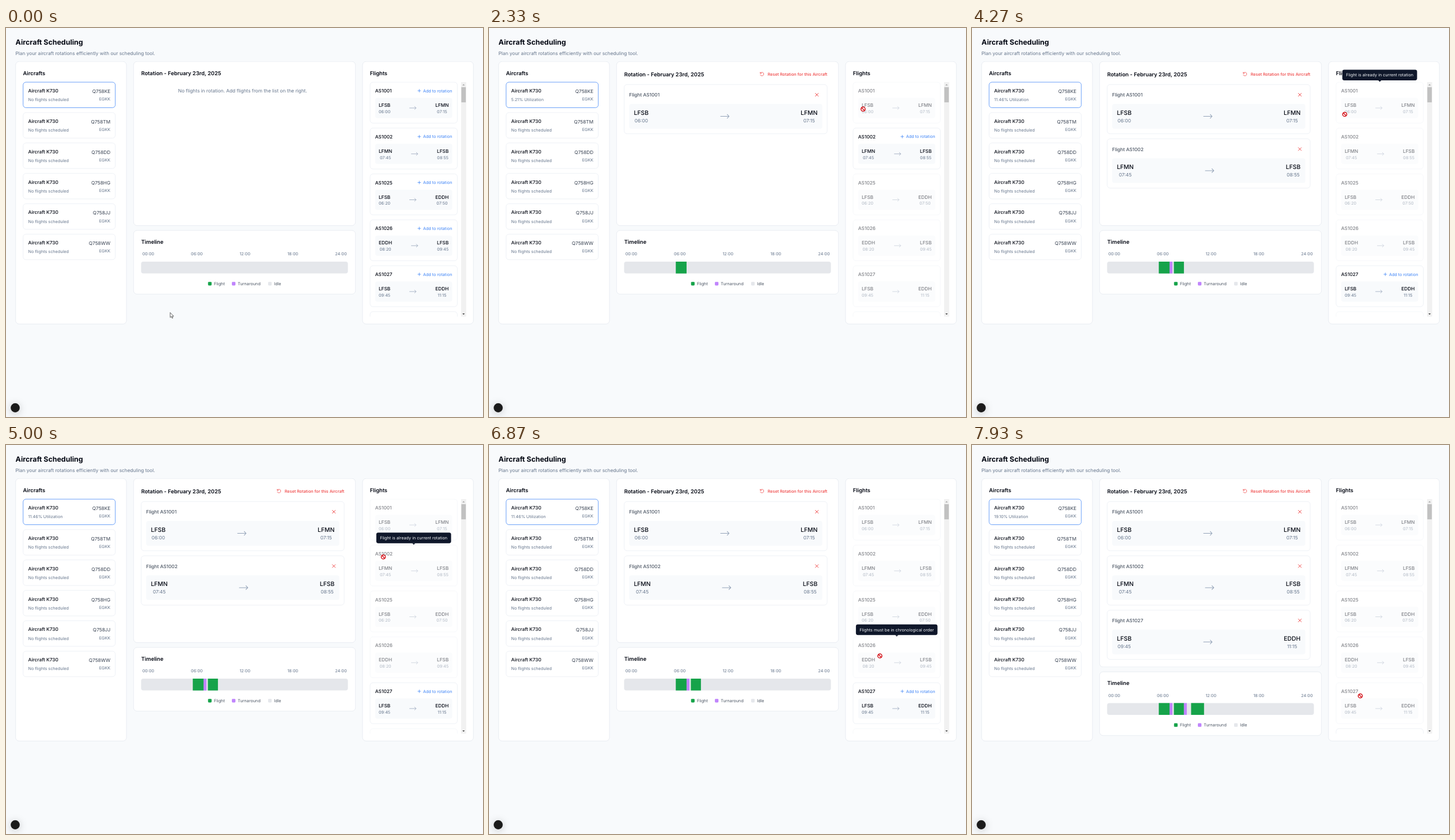
These frames come from a looping animation (828x676 px, 8 s). An HTML page:

```html
<!DOCTYPE html>
<html lang="en">
<head>
<meta charset="utf-8">
<title>Aircraft Scheduling</title>
<style>
  html, body { margin: 0; width: 100%; height: 100%; overflow: hidden; background: #f8fafc; }
  svg { display: block; width: 828px; height: 676px; }
  text { font-family: Inter, sans-serif; text-rendering: geometricPrecision; white-space: pre; }
  .panel { fill: #fff; stroke: #e2e8f0; stroke-width: .6; filter: drop-shadow(0 .6px .6px rgba(0,0,0,.07)); }
  .card { fill: #fff; stroke: #e2e8f0; stroke-width: .6; }
  .card.active { stroke: #3b82f6; stroke-width: .75; }
  .inner { fill: #f8fafc; }
  .line { fill: none; stroke-linecap: round; stroke-linejoin: round; }
  .badge { fill: #1b1b1b; filter: drop-shadow(0 2px 7px rgba(0,0,0,.22)); }
</style>
</head>
<body>
<svg id="stage" viewBox="0 0 828 676"></svg>
<script>
const INK = '#030712', SOFT = '#374151', GRAY = '#4b5563', MUTED = '#64748b';
const BLUE = '#3b82f6', RED = '#ef4444', GREEN = '#16a34a', PURPLE = '#c084fc', IDLE = '#e5e7eb';
const XS = 7.245, SM = 8.28, MD = 9.315, LG = 10.35, XL = 12.42;
const PITCH = 79.75, LOOP = 8000, STEP = 1000 / 15;

const FLIGHTS = [
  ['AS1001', 'LFSB', '06:00', 'LFMN', '07:15'],
  ['AS1002', 'LFMN', '07:45', 'LFSB', '08:55'],
  ['AS1025', 'LFSB', '06:20', 'EDDH', '07:50'],
  ['AS1026', 'EDDH', '08:20', 'LFSB', '09:45'],
  ['AS1027', 'LFSB', '09:45', 'EDDH', '11:15'],
  ['AS1028', 'EDDH', '12:00', 'LFSB', '13:25']
];
const ROTATION = [0, 1, 4];
const CLICKS = [1733, 3133, 7533];
const USAGE = ['No flights scheduled', '5.21% Utilization', '11.46% Utilization', '19.10% Utilization'];
// flights that can be added after each click
const OPEN = [[0, 1, 2, 3, 4, 5], [1], [4], [5]];
const PLANES = ['Q758KE', 'Q758TM', 'Q758DD', 'Q758HG', 'Q758JJ', 'Q758WW'];

// pointer stops: time, x, y
const PATH = [
  [0, 285, 494.5], [67, 285, 494.5], [933, 608, 151.5], [1067, 608, 151.5], [1533, 649, 139.5],
  [2267, 649, 139.5], [3000, 663.5, 199.5], [3667, 663.5, 200], [3933, 634, 172], [4133, 647, 150],
  [4667, 647, 150], [5000, 655, 194.5], [5200, 655, 194.5], [5733, 674.5, 272], [6067, 674.5, 272],
  [6733, 678, 364.5], [6867, 678.5, 366.5], [7333, 674, 436], [LOOP, 674, 436]
];

const text = (x, y, size, fill, str, weight = 400, anchor = 'start', id = '') =>
  `<text x="${x}" y="${y + size * .364}" font-size="${size}" fill="${fill}" font-weight="${weight}" text-anchor="${anchor}"${id && ` id="${id}"`}>${str}</text>`;
const box = (x, y, w, h, r, attrs) =>
  `<rect x="${x}" y="${y}" width="${w}" height="${h}" rx="${r}" ${attrs}/>`;
const line = (d, color, width) =>
  `<path class="line" d="${d}" stroke="${color}" stroke-width="${width}"/>`;
const arrow = (x, y, half, head) =>
  line(`M${x - half} ${y}h${2 * half}m${-head} ${-head}l${head} ${head}l${-head} ${head}`, '#94a3b8', half / 7.2);
const group = (id, body, attrs = '') => `<g id="${id}" ${attrs}>${body}</g>`;
const minutes = s => { const [h, m] = s.split(':'); return h * 60 + +m; };
const timeX = m => 234.5 + 359 * m / 1440;

function planeCard(reg, i) {
  const y = 94.1 + i * 52.83;
  return box(29.7, y, 160, 44.4, 5, `class="card${i ? '' : ' active'}"`) +
    text(38.5, y + 14.9, SM, INK, 'Aircraft K730', 500) +
    text(38.5, y + 30.5, XS, MUTED, USAGE[0], 400, 'start', i ? '' : 'usage') +
    text(181.2, y + 16, SM, SOFT, reg, 400, 'end') +
    text(181.2, y + 29.6, XS, MUTED, 'EGKK', 400, 'end');
}

function flightCard([no, from, dep, to, arr], i) {
  const wide = from !== 'LFSB', a = wide ? 658.6 : 657.1, b = wide ? 758.2 : 756.9;
  return group('flight' + i,
    box(632, 94.1, 151.4, 71.2, 5, `class="card" id="edge${i}"`) +
    box(640.8, 121.4, 133.8, 35.2, 4, 'class="inner"') +
    text(640.8, 109, SM, INK, no, 500) +
    text(a, 134, SM, INK, from, 500, 'middle') + text(a, 145.3, XS, MUTED, dep, 400, 'middle') +
    text(b, 134, SM, INK, to, 500, 'middle') + text(b, 145.3, XS, MUTED, arr, 400, 'middle') +
    arrow(wide ? 709.2 : 706.2, 139, 5.6, 2.5) +
    group('add' + i,
      line('M714.9 109h4.9M717.35 106.55v4.9', BLUE, .75) +
      text(774.6, 108.9, XS, BLUE, 'Add to rotation', 400, 'end')),
    `transform="translate(0 ${i * PITCH})"`);
}

function rotationCard([no, from, dep, to, arr], i) {
  const wide = from !== 'LFSB', a = wide ? 266 : 264.3, b = wide ? 557.5 : 555.7;
  return `<g transform="translate(0 ${i * 94.4})">` +
    box(234.7, 98.2, 352.3, 85.6, 5, 'class="card"') +
    box(243.3, 132, 335.3, 42.9, 4, 'class="inner"') +
    text(243.3, 116.2, SM, GRAY, 'Flight ' + no, 500) +
    line('M566.5 113.4l5.2 5.2M571.7 113.4l-5.2 5.2', RED, .95) +
    text(a, 147.2, LG, INK, from, 500, 'middle') + text(a, 160.7, SM, MUTED, dep, 400, 'middle') +
    text(b, 147.2, LG, INK, to, 500, 'middle') + text(b, 160.7, SM, MUTED, arr, 400, 'middle') +
    arrow(wide ? 412.4 : 409.4, 153.5, 7.4, 3.3) + '</g>';
}

function timeline(list) {
  let s = box(221.5, 351.8, 385, 110.6, 6, 'class="panel"') +
    text(234.7, 371.5, MD, INK, 'Timeline', 600);
  [['00:00', 236.7, 'start'], ['06:00', 331.2, 'middle'], ['12:00', 414.7, 'middle'],
   ['18:00', 497.7, 'middle'], ['24:00', 591.5, 'end']]
    .forEach(([str, x, anchor]) => s += text(x, 392.6, XS, MUTED, str, 400, anchor));
  s += box(234.5, 406, 359, 20.6, 4, `fill="${IDLE}"`);
  const bar = (m, len, color) => box(timeX(m), 406, 359 * len / 1440, 20.6, 0, `fill="${color}"`);
  list.forEach(([, , dep, , arr], i) => {
    const start = minutes(dep), end = minutes(arr);
    s += bar(start, end - start, GREEN);
    if (i < list.length - 1) s += bar(end, 20, PURPLE);
  });
  [['Flight', 350.7, GREEN], ['Turnaround', 392.1, PURPLE], ['Idle', 455, IDLE]]
    .forEach(([str, x, color]) => s += box(x, 441.2, 6.2, 6.2, 1.4, `fill="${color}"`) +
      text(x + 10.2, 444.4, XS, GRAY, str));
  return s;
}

function middle(n) {
  const list = ROTATION.slice(0, n).map(i => FLIGHTS[i]), grow = n === 3 ? 42.4 : 0;
  let s = box(221.5, 58.3, 385, 285 + grow, 6, 'class="panel"') +
    text(234.7, n ? 80.4 : 78.2, MD, INK, 'Rotation - February 23rd, 2025', 600);
  s += n
    ? line('M471 78.6a3.1 3.1 0 1 1-.1 2.7M470.9 76.9v2h2', RED, .8) +
      text(587.3, 80.3, XS, RED, 'Reset Rotation for this Aircraft', 500, 'end')
    : text(410.7, 108.5, SM, MUTED, 'No flights in rotation. Add flights from the list on the right.', 400, 'middle');
  s += list.map(rotationCard).join('');
  return group('mid' + n, s + `<g transform="translate(0 ${grow})">${timeline(list)}</g>`);
}

const scrollbar = box(789.9, 94, 8.8, 407.5, 0, 'fill="#f1f1f1"') +
  box(790.4, 102.8, 7.8, 26.4, 0, 'fill="#c1c1c1"') +
  '<path d="M792.2 99.7h4.2l-2.1-2.3z" fill="#a3a3a3"/><path d="M792.2 496h4.2l-2.1 2.3z" fill="#404040"/>';

const pointers = {
  arrow: '<path d="M0 0V8.6L2 6.8L3.4 9.9L4.7 9.3L3.4 6.4H6.1Z" fill="#fff" stroke="#111" stroke-width=".65"/>',
  hand: '<path d="M-1 7.2V1Q-1 0 0 0Q1 0 1 1V4.1Q2.2 3.5 2.7 4.5Q3.9 4.1 4.3 5.1Q5.7 4.9 5.7 6.2V8.6Q5.7 10 4.8 11V12.3H-.8V11.2L-3.4 7.7Q-4 6.6 -3.1 6.2Q-2.2 5.9 -1 7.2Z" fill="#fff" stroke="#111" stroke-width=".7"/><path d="M1 4.1V6.4M2.7 4.6V6.6M4.3 5.2V6.8" stroke="#111" stroke-width=".5"/>',
  no: '<circle r="3.6" fill="#fff" stroke="#d30f16" stroke-width="1.5"/><path d="M-2.5 -2.5L2.5 2.5" stroke="#d30f16" stroke-width="1.5"/>'
};

const stage = document.getElementById('stage');
stage.innerHTML =
  '<clipPath id="list"><rect x="631" y="93.5" width="154" height="408"/></clipPath>' +
  box(0, 0, 828, 676, 0, 'fill="#f8fafc"') +
  text(16.6, 24.7, XL, INK, 'Aircraft Scheduling', 700) +
  text(16.6, 43.8, SM, MUTED, 'Plan your aircraft rotations efficiently with our scheduling tool.') +
  box(16.8, 58.3, 192.2, 456, 6, 'class="panel"') +
  text(29.5, 78.2, MD, INK, 'Aircrafts', 600) + PLANES.map(planeCard).join('') +
  [0, 1, 2, 3].map(middle).join('') +
  box(619, 58.3, 192.2, 456, 6, 'class="panel"') +
  text(631.8, 78.2, MD, INK, 'Flights', 600) +
  `<g clip-path="url(#list)">${FLIGHTS.map(flightCard).join('')}</g>` + scrollbar +
  '<circle class="badge" cx="16" cy="660" r="7.9"/>' +
  group('tip', box(0, 72.4, 0, 18.6, 3.4, 'id="tipBox" fill="#0f172a"') +
    '<path d="M705.2 90.9h5.2l-2.6 2.7z" fill="#0f172a"/>' +
    text(707.7, 81.8, XS, '#f8fafc', '', 400, 'middle', 'tipText')) +
  group('pointer', Object.entries(pointers).map(([k, v]) => group(k, v)).join(''));

const el = id => document.getElementById(id);
const show = (id, on) => el(id).style.display = on ? '' : 'none';
const clamp = v => Math.max(0, Math.min(1, v));
const ease = p => p * p * (3 - 2 * p);

function pointerAt(t) {
  const i = Math.max(1, PATH.findIndex(p => p[0] > t));
  const [t0, x0, y0] = PATH[i - 1], [t1, x1, y1] = PATH[i], p = ease((t - t0) / (t1 - t0));
  return [x0 + (x1 - x0) * p, y0 + (y1 - y0) * p];
}

function cardAt(x, y) {
  const i = Math.floor((y - 94) / PITCH);
  return x > 632 && x < 783.5 && i >= 0 && i < 5 && y - 94 - i * PITCH < 71.3 ? i : -1;
}

function draw(now) {
  // the screen refreshes 15 times a second
  const t = Math.floor((now % LOOP + 4) / STEP) * STEP + .5;
  const n = CLICKS.filter(c => t >= c).length;
  const [x, y] = pointerAt(t), over = cardAt(x, y), open = OPEN[n];
  const fade = n ? ease(clamp((t - CLICKS[n - 1] + 33) / 200)) : 1;

  for (let i = 0; i < 4; i++) show('mid' + i, i === n);
  el('usage').textContent = USAGE[n];

  const level = (i, k) => OPEN[k].includes(i) ? 1 : .5;
  FLIGHTS.forEach((f, i) => {
    const before = level(i, Math.max(0, n - 1)), after = level(i, n);
    el('flight' + i).setAttribute('opacity', before + (after - before) * fade);
    el('edge' + i).classList.toggle('active', i === over && after === 1);
    show('add' + i, after === 1);
  });

  const kind = over < 0 ? 'arrow' : open.includes(over) ? 'hand' : 'no';
  for (const k in pointers) show(k, k === kind);
  el('pointer').setAttribute('transform', `translate(${x} ${y})`);

  const tip = kind === 'no' && t > 4133 && t < 7500;
  show('tip', tip);
  if (tip) {
    const used = over < 2, w = used ? 129.8 : 141.6;
    el('tipBox').setAttribute('x', 707.7 - w / 2);
    el('tipBox').setAttribute('width', w);
    el('tipText').textContent = used ? 'Flight is already in current rotation' : 'Flights must be in chronological order';
    el('tip').setAttribute('transform', `translate(0 ${over * PITCH})`);
    el('tip').setAttribute('opacity', clamp((t - 4100) / 150));
  }
}

const begin = performance.now();
function tick() {
  draw(performance.now() - begin);
  requestAnimationFrame(tick);
}
tick();
</script>
</body>
</html>
```
